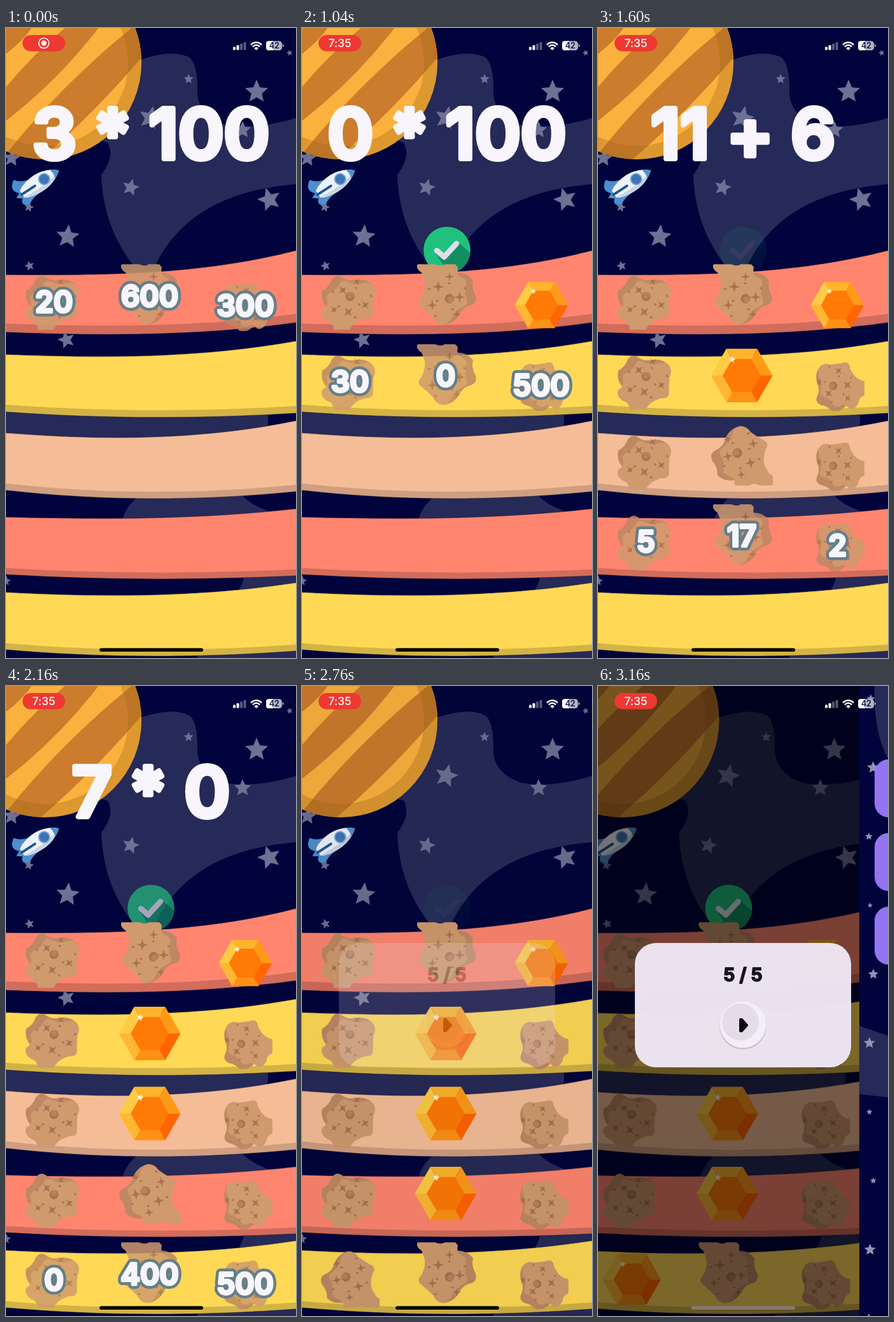
Recreate the animation shown at these times as an HTML page. Size 456x988 px, loop 3.2 s.

```html
<!DOCTYPE html>
<html lang="en">
<head>
<meta charset="utf-8">
<title>Space quiz</title>
<style>
  html, body { margin: 0; width: 100%; height: 100%; overflow: hidden; background: #01043c; }
  svg { display: block; width: 100vw; height: 100vh; }
  text { font-family: Inter, "Open Sans", sans-serif; font-weight: 600; text-anchor: middle; font-feature-settings: "calt" 0; }
  .round { stroke-linejoin: round; stroke-linecap: round; }
  #question { font-size: 109px; fill: #f8f6fc; stroke: #f8f6fc; stroke-width: 8; }
  .label { font-size: 46px; fill: #f8f6fc; stroke: #f8f6fc; stroke-width: 4; }
  .edge { stroke: #647f8a; stroke-width: 13; }
</style>
</head>
<body>
<svg viewBox="0 0 456 988" preserveAspectRatio="none">
  <defs>
    <clipPath id="disc"><circle cx="61" cy="54" r="152"/></clipPath>
    <clipPath id="badge"><circle cx="228" cy="348.5" r="37"/></clipPath>
    <clipPath id="tile"><rect x="-49" y="-49" width="98" height="96"/></clipPath>
    <g id="rock">
      <path fill="#be8863" d="M18-36Q34-36 43-24Q40-12 47 0Q50 12 40 15Q26 18 20 32Q10 46-6 46L0-20Z"/>
      <path fill="#cf9a6e" d="M-38-36Q-50-44-42-52Q-30-60-18-50Q-8-44 0-50Q14-54 19-44Q16-32 26-28Q34-24 32-16Q28-4 33 6Q36 14 26 18Q14 24 10 34Q4 46-6 46Q-16 44-20 34Q-30 24-40 16Q-46 10-38 2Q-30-14-34-26Z"/>
    </g>
    <g id="gem"></g>
  </defs>

  <g id="page">
    <path fill="#01043c" d="M0 0H456V988H0Z"/>
    <g fill="#262a58">
      <path d="M205 52Q260 32 288 46Q302 56 301 105Q304 138 345 152Q395 160 456 141V245Q290 258 235 372H200Q152 310 150 230Q172 202 160 180L130 170Z"/>
      <path d="M0 590H412V618Q410 634 396 650H0Z"/>
      <path d="M182 775Q188 745 222 725H365Q380 748 420 760V775Z"/>
      <path d="M376 850Q380 872 300 988H456V850Z"/>
    </g>
    <g id="stars"></g>

    <g clip-path="url(#disc)">
      <path fill="#fbb13d" d="M-95-100H215V210H-95Z"/>
      <g id="stripes" fill="#cb7c2c"></g>
      <circle cx="61" cy="54" r="152" fill="none" stroke="#9c6418" stroke-opacity=".32" stroke-width="42"/>
    </g>

    <g transform="translate(48 246) rotate(-33)">
      <path fill="#4d8fcd" d="M0-12Q-20-16-26-26Q-42-16-30-4L-38 0L-30 6Q-40 14-26 20Q-18 14 2 12Z"/>
      <path fill="#eef2fa" d="M42 0Q22-18-6-14Q-22-11-27-6V6Q-22 11-6 13Q22 16 42 0Z"/>
      <path fill="#c9d5e6" d="M42 0Q22 16-6 13Q-22 11-27 6Q14 10 42 0Z"/>
      <path fill="#4d8fcd" d="M42 0Q36-6 30-9Q33 0 30 8Q36 5 42 0Z"/>
      <path stroke="#1f5797" stroke-width="4" stroke-linecap="round" d="M-28 0H-3"/>
      <circle cx="15" cy="-1" r="8.5" fill="#3d74b8" stroke="#70a5d8" stroke-width="2"/>
    </g>

    <g id="bands"></g>
    <text id="question" class="round" x="228" y="205"></text>

    <g id="check">
      <g clip-path="url(#badge)">
        <circle cx="228" cy="348.5" r="37" fill="#20c17f"/>
        <path fill="#128e62" d="M246 336L270 358V400H240L208 350L224 362Z"/>
      </g>
      <path class="round" fill="none" stroke="#dcdfe9" stroke-width="8.5" d="M212 349L223.500 359L243 338"/>
    </g>
    <g id="rows"></g>
    <path id="shade" d="M0 0H456V988H0Z"/>
  </g>

  <g id="next">
    <path fill="#01043c" d="M0 0H456V988H0Z"/>
    <path fill="#262a58" d="M24 0Q22 70 44 112H456V0ZM0 533L44 548H456V645H44L0 640Z"/>
    <g id="nextStars"></g>
    <g id="buttons" fill="#9474f2"></g>
  </g>

  <g id="panel">
    <rect x="58" y="403" width="340" height="195" rx="33" fill="#eee6f3" fill-opacity=".98"/>
    <text class="round" x="228" y="462.5" font-size="29" fill="#15141f" stroke="#15141f" stroke-width="2">5 / 5</text>
    <circle cx="228" cy="533" r="37" fill="#c9c1d0"/>
    <circle cx="228" cy="531" r="36.5" fill="#f3eef7"/>
    <circle cx="224" cy="527" r="29" fill="#e4dde9"/>
    <path class="round" stroke="#08080e" stroke-width="4" fill="#08080e" d="M224 523V541L226 541L234 532L226 523Z"/>
  </g>

  <rect x="26" y="11" width="67" height="25.5" rx="12.7" fill="#ee3832"/>
  <g id="record">
    <circle cx="59.5" cy="23.7" r="8" fill="none" stroke="#fff" stroke-width="1.6"/>
    <circle cx="59.5" cy="23.7" r="4" fill="#fff"/>
  </g>
  <text id="clock" x="59.5" y="30" font-size="17.5" style="font-weight:500" fill="#fff">7:35</text>
  <g fill="#fff">
    <g id="signal"></g>
    <path d="M393.500 35L390 31.500Q393.500 28.500 397 31.500Z"/>
    <path fill="none" stroke="#fff" stroke-width="2.4" d="M387.800 29.300Q393.500 24.300 399.200 29.300M385 26.300Q393.500 18.700 402 26.300"/>
    <rect x="409" y="20.5" width="25" height="14.5" rx="4.5" fill="#b2b3c0"/>
    <path d="M413 20.500H420V35H413Q409 35 409 31V24.500Q409 20.500 413 20.500ZM435 25.500Q438 27.500 435 30Z"/>
  </g>
  <text x="421.7" y="32.2" font-size="12.5" fill="#14173f">42</text>
  <rect id="home" x="147" y="972.5" width="163" height="5.5" rx="2.7"/>
</svg>
<script>
const $ = id => document.getElementById(id);
const LOOP = 3200, PITCH = 125.5, TAPPED_TURN = 170;
const ROUNDS = [
  { tap: 450, question: '3 * 100', labels: [20, 600, 300], pick: 2 },
  { tap: 1080, question: '0 * 100', labels: [30, 0, 500], pick: 1 },
  { tap: 1528, question: '5 + 9', labels: [12, 14, 3], pick: 1 },
  { tap: 2136, question: '11 + 6', labels: [5, 17, 2], pick: 1 },
  { tap: 2685, question: '7 * 0', labels: [0, 400, 500], pick: 0 }
];
const SLOTS = [
  { x: 75.5, y: 428.5, size: .95 },
  { x: 226, y: 419.5, size: 1 },
  { x: 376.5, y: 434.5, size: .865 }
];

const ramp = (t, start, span) => Math.min(1, Math.max(0, (t - start) / span));
const times = (n, make) => Array.from({ length: n }, (_, i) => make(i)).join('');
const polar = (r, a) => [r * Math.cos(a), r * Math.sin(a)];

function star(x, y, r, turn = 0) {
  const points = times(10, i => {
    const [dx, dy] = polar(i % 2 ? r * .46 : r, turn + (i / 5 - .5) * Math.PI);
    return `${x + dx},${y + dy} `;
  });
  return `<polygon class="round" points="${points}"/>`;
}

// Four curved arms around a point.
const spark = (x, y, r) =>
  `<path d="M${x} ${y - r}Q${x} ${y} ${x + r} ${y}Q${x} ${y} ${x} ${y + r}Q${x} ${y} ${x - r} ${y}Q${x} ${y} ${x} ${y - r}"/>`;

// Sparks and pits spiral outwards around the crater.
$('rock').innerHTML += '<g class="round" fill="#a9734f" stroke="#a9734f">' +
  times(5, i => spark(...polar(18 + 4 * i, 4 + i * 2.4), 8 - i * .7)) +
  times(6, i => {
    const [x, y] = polar(16 + 4 * i, 2.6 + i * 2.4);
    return `<ellipse cx="${x}" cy="${y}" rx="1.8" ry="1"/>`;
  }) +
  '<circle cx="6" cy="5" r="7"/></g><circle cx="7.5" cy="6.5" r="5" fill="#b98160"/>';

const FACETS = ['#ff6500', '#ff9115', '#ffb733', '#ffcb45', '#ffb42b', '#ff9a17'];
const corner = (i, r) => polar(r, i * Math.PI / 3);
const hexagon = r => times(6, i => corner(i, r) + ' ');
$('gem').innerHTML = FACETS.map((fill, i) =>
  `<polygon fill="${fill}" points="0,0 ${corner(i, 48.500)} ${corner(i + 1, 48.500)}"/>`).join('') +
  `<polygon fill="#ff7a06" points="${hexagon(30)}"/><g fill="#fff6e0">${star(-15, -25, 5.5, .2)}</g>`;

const STARS = [
  { r: 19, at: [[394, 100], [227, 141], [414, 269], [97, 327]] },
  { r: 14, at: [[372, 160], [196, 250], [95, 489], [9, 204]] },
  { r: 8, at: [[287, 80], [36, 281], [37, 373], [0, 867]] }
];
$('stars').innerHTML = '<g fill="#6e7094">' +
  STARS.map(({ r, at }) => at.map(([x, y], i) => star(x, y, r, .3 * Math.sin(i * 2.2))).join('')).join('') +
  star(446, 39, 5, -1.5) + '</g>';

$('nextStars').innerHTML = '<g fill="#9192b4">' +
  times(10, i => star(18 + 4 * Math.sin(i * 2), 20 + i * 108, 7 + 3 * Math.sin(i * 1.7))) + '</g>';
$('buttons').innerHTML = times(3, i => `<rect x="24" y="${115 + i * 115.5}" width="408" height="91" rx="22"/>`);
$('signal').innerHTML = times(4, i =>
  `<rect x="${357 + i * 5.500}" y="${29.500 - i * 2.500}" width="4" height="${5 + i * 2.500}" rx="1" fill-opacity="${i < 2 ? 1 : .35}"/>`);

$('stripes').innerHTML = times(3, i => {
  const a = i * 105 - 10, b = a + 52;
  return `<path d="M${a}-2H${b}Q${b * .56} ${b * .56}-2 ${b}V${a}Q${a * .44} ${a * .44} ${a}-2"/>`;
});

// A band hangs from y at the left, sags, and ends higher by rise at the right.
function band({ y, rise, sag }, i) {
  const [color, dark] = [['#ff856f', '#d26c5b'], ['#ffd955', '#d3b346'], ['#f5bd97', '#d09e80']][i % 3];
  const edge = (y0, dip, end) => [`0 ${y0}C152 ${y0 + dip} 304 ${y0 + dip} 456 ${end}`,
    `456 ${end}C304 ${y0 + dip} 152 ${y0 + dip} 0 ${y0}`];
  const right = y + 92 - Math.max(0, rise - 21), depth = 8 + rise * .15;
  const [top] = edge(y, sag, y - rise);
  const [low, lowBack] = edge(y + 90, sag + 5, right);
  const [, midBack] = edge(y + 90 - depth, sag + 5, right - depth);
  return `<path fill="${dark}" d="M${top}L${lowBack}Z"/><path fill="${color}" d="M${top}L${midBack}Z"/>` +
    `<path fill="none" stroke="#1d1830" stroke-opacity=".5" d="M${top}M${low}"/>`;
}
$('bands').innerHTML = [
  { y: 387, rise: 38, sag: 1 },
  { y: 512, rise: 21, sag: 6 },
  { y: 635, rise: 19, sag: 12 },
  { y: 767, rise: 13, sag: 4 },
  { y: 885, rise: 15, sag: 8 }
].map(band).join('');

function cell(t, row, col, answered) {
  const { tap, pick, labels } = ROUNDS[row], { x, y, size } = SLOTS[col];
  const done = row < answered, picked = done && pick === col;
  const gem = picked ? ramp(t, tap + 80, 60) : 0;
  const turn = picked ? TAPPED_TURN : (col - 1) * 130;
  const text = style => `<text class="label round ${style}" y="17">${labels[col]}</text>`;
  return `<g transform="translate(${x} ${y + row * PITCH})"><g transform="scale(${size})">` +
    `<g clip-path="url(#tile)" opacity="${done ? 1 - gem : .85}"><use href="#rock" transform="rotate(${turn})"/></g>` +
    `<use href="#gem" opacity="${gem}"/></g>${done ? '' : text('edge') + text('')}</g>`;
}

function draw(t) {
  const answered = ROUNDS.filter(round => t >= round.tap).length;
  $('rows').innerHTML = times(Math.min(answered + 1, ROUNDS.length), row =>
    times(SLOTS.length, col => cell(t, row, col, answered)));
  $('question').textContent = answered < ROUNDS.length ? ROUNDS[answered].question : '';

  // The old tick fades out at a tap, the new one follows the gem.
  const tap = answered ? ROUNDS[answered - 1].tap : LOOP;
  const old = answered > 1 ? 1 - ramp(t, tap, 80) : 0;
  $('check').setAttribute('opacity', Math.max(old, ramp(t, tap + 100, 100)));

  const shade = ramp(t, 2745, 150);
  $('shade').setAttribute('fill-opacity', shade * .52);
  $('panel').setAttribute('opacity', ramp(t, 2735, 130));
  $('home').setAttribute('fill', `rgb(${[130, 122, 112].map(v => Math.round(v * shade * shade))})`);

  const push = 44 * Math.max(0, t - 3120) / 40;
  $('page').setAttribute('transform', `translate(${-push / 2} 0)`);
  $('next').setAttribute('transform', `translate(${456 - push} 0)`);

  const timed = t >= 800;
  $('record').setAttribute('opacity', timed ? 0 : 1);
  $('clock').setAttribute('opacity', timed ? 1 : 0);
}

const begin = performance.now();
function tick() {
  draw((performance.now() - begin) % LOOP);
  requestAnimationFrame(tick);
}
tick();
</script>
</body>
</html>
```
